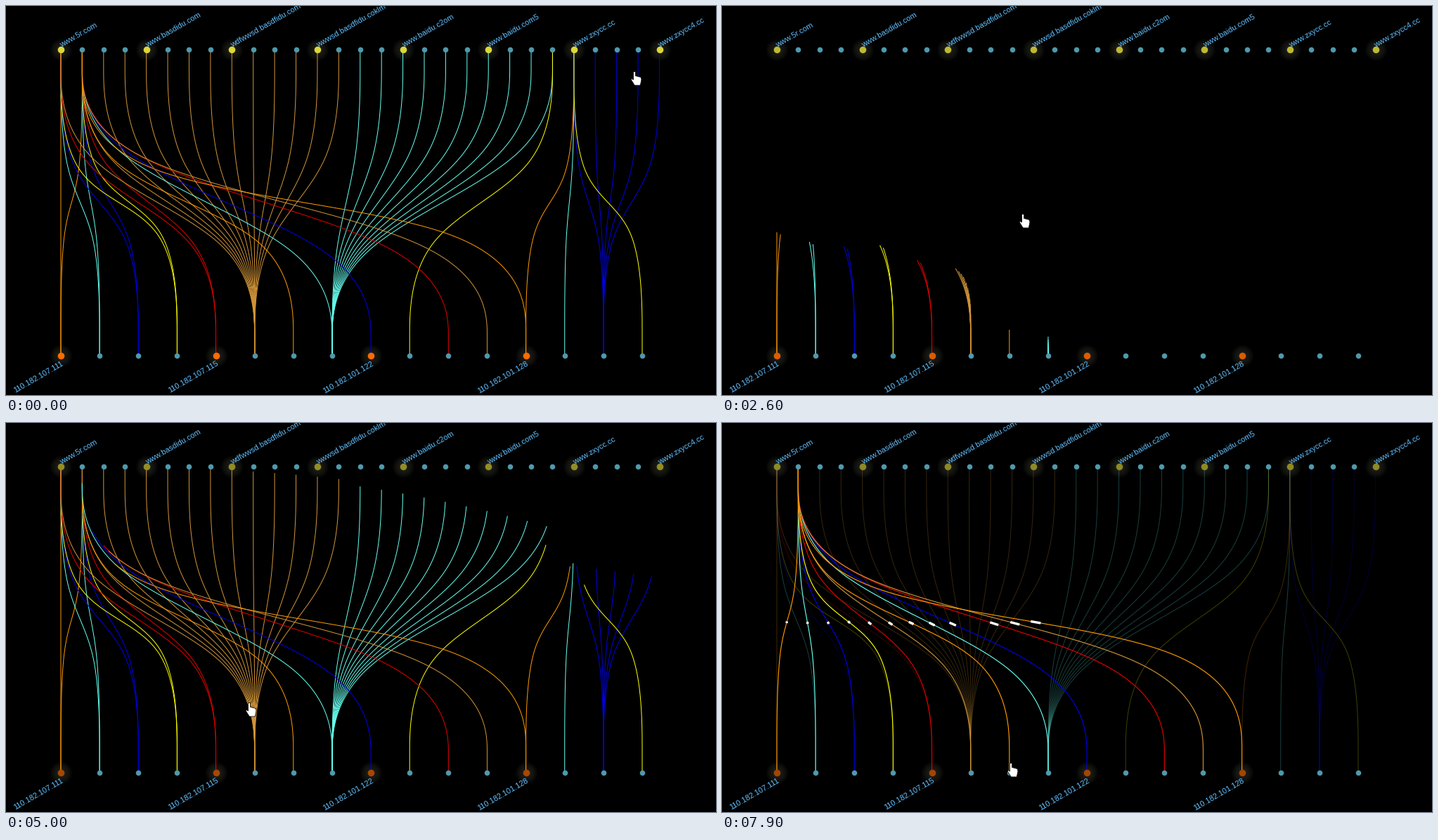
Recreate the animation shown at these times as a matplotlib script. Size 1010 px wide and 554 px high, loop 8 s.

```python
import numpy as np
import matplotlib.pyplot as plt
from matplotlib.animation import FuncAnimation
from matplotlib.collections import LineCollection
from matplotlib.patches import Polygon

W, H, DPI = 1010, 554, 100
STEP, FRAMES = 100, 80
PX = 72 / DPI

TOP_Y, BOTTOM_Y = 61.7, 498.2
top_x = np.linspace(78, 929.5, 29)
bottom_x = np.linspace(78, 905, 16)

PALETTE = ["#ff9900", "#66fff0", "#0000e6", "#ffff00", "#e60000", "#d19438"]
NODE, LABEL = "#4f99ad", "#62c0ff"
SITE = np.array([.87, .845, .22])
HOST = np.array([1, .42, 0])

SITES = ["www.5r.com", "www.basdidu.com", "wdfwwsd.basdfidu.com",
         "wwwsd.basdfidu.coklm", "www.baidu.c2om", "www.baidu.com5",
         "www.zxycc.cc", "www.zxycc4.cc"]
HOSTS = ["110.182.107.111", "110.182.107.115",
         "110.182.101.122", "110.182.101.128"]

RELOAD, GROW, STAGGER = 1300, 1390, 28
SELECT, PICKED = 6250, 1

# Cursor path: time, x, y of the tip
CURSOR = np.array([
    (0, 894, 93), (500, 467, 218), (1100, 467, 218), (2500, 428, 296),
    (4400, 428, 296), (5000, 346, 398), (6000, 106, 62), (6500, 106, 62),
    (7000, 365, 80), (7900, 411, 484)], float)
HAND = np.array([(-1.5, .5), (1.5, .5), (1.6, 6.5), (9.3, 8.5), (10, 12),
                 (8.3, 20), (.2, 20), (-4.8, 12), (-4.4, 10.3), (-1.5, 12)])
ARROW = np.array([(0, 0), (0, 14.5), (3.4, 11.6), (5.8, 17.2), (8.2, 16.2),
                  (5.8, 10.7), (10.2, 10.3)])


def linked_tops(j):
    """Top nodes joined to bottom node j: two hubs, a late hub and fans."""
    fans = {5: range(2, 14), 7: range(14, 24), 9: [23], 14: range(25, 29)}
    tops = set(fans.get(j, []))
    if j < 6:
        tops.add(0)
    if j < 13 and j != 9:
        tops.add(1)
    if j > 11:
        tops.add(24)
    return sorted(tops)


def reach(j):
    """How far the curves of bottom node j stay upright."""
    return (175 + 13 * np.cos(2 * np.pi * j / 3)
            + 15 * np.cos(2 * np.pi * (j - 1.7) / 12))


def spline(ctrl, u):
    """Uniform cubic B-spline with clamped ends, u from 0 to 5."""
    seg = np.clip(u.astype(int), 0, 4)
    t = (u - seg)[:, None]
    a, b, c, d = (ctrl[seg + n] for n in range(4))
    return ((1 - t)**3 * a + (3 * t**3 - 6 * t**2 + 4) * b
            + (-3 * t**3 + 3 * t**2 + 3 * t + 1) * c + t**3 * d) / 6


def controls(j, i):
    x0, x1, r = bottom_x[j], top_x[i], reach(j)
    return np.array([(x0, BOTTOM_Y)] * 3 + [(x0, BOTTOM_Y - r)]
                    + [(x1, TOP_Y + r)] + [(x1, TOP_Y)] * 3)


def travel(ms):
    """Curve position reached after a time; quicker near both ends."""
    return np.interp(ms, [0, 850, 2550, 3400], [0, 1.7, 3.3, 5])


def part(ctrl, u0, u1):
    n = int((u1 - u0) * 40) + 2
    return spline(ctrl, np.linspace(u0, u1, n))


links = [(j, i) for j in range(len(bottom_x)) for i in linked_tops(j)]
ctrls = [controls(j, i) for j, i in links]
full = [part(c, 0, 5) for c in ctrls]
colors = [PALETTE[j % len(PALETTE)] for j, _ in links]
picked = [k for k, (_, i) in enumerate(links) if i == PICKED]
others = [k for k in range(len(links)) if k not in picked]

fig = plt.figure(figsize=(W / DPI, H / DPI), dpi=DPI, facecolor="black")
ax = fig.add_axes([0, 0, 1, 1])
ax.set_xlim(0, W)
ax.set_ylim(H, 0)
ax.axis("off")


def dots(x, y, radius, color, z, alpha=1):
    return ax.scatter(x, np.full(len(x), y), s=(2 * radius * PX)**2,
                      color=[color], linewidths=0, zorder=z, alpha=alpha,
                      snap=False)


def strokes(width, z, **kw):
    lines = LineCollection([], linewidths=width * PX, zorder=z, snap=False,
                           **kw)
    return ax.add_collection(lines, autolim=False)


glows, small, big = [], [], []
for xs, y, color in ((top_x, TOP_Y, SITE), (bottom_x, BOTTOM_Y, HOST)):
    mask = np.arange(len(xs)) % 4 == 0
    glows += [dots(xs[mask], y, r, "#8c8c80", 1, .025) for r in range(6, 17)]
    small.append(dots(xs[~mask], y, 3.8, NODE, 5))
    big.append((dots(xs[mask], y, 4.8, color, 5), color))

style = dict(rotation=30, rotation_mode="anchor", va="baseline", color=LABEL,
             family="Liberation Sans", fontsize=11 * PX, zorder=6)
labels = [ax.text(x + 1, 59, s, ha="left", **style)
          for x, s in zip(top_x[::4], SITES)]
labels += [ax.text(x + 4.5, 511, s, ha="right", **style)
           for x, s in zip(bottom_x[::4], HOSTS)]

lines = strokes(1, 2)
strong = strokes(1.15, 3, colors=[colors[k] for k in picked])
strong.set_segments([full[k] for k in picked])
dashes = strokes(3.4, 4, colors="white", capstyle="butt")
cursor = ax.add_patch(Polygon(HAND, facecolor="white", edgecolor="black",
                              linewidth=.8 * PX, joinstyle="round", zorder=9))


def brightness(ms):
    if ms < GROW:
        return np.interp(ms, [650, 1150], [1, .58])
    return .78 + .14 * np.cos(2 * np.pi * (ms - 3100) / 3250)


def draw_links(ms):
    chosen = ms >= SELECT
    strong.set_visible(chosen)
    dashes.set_visible(chosen)
    if chosen:
        lines.set_segments([full[k] for k in others])
        lines.set_color([(colors[k], .25) for k in others])
        u = travel(ms - SELECT)
        dashes.set_segments([part(ctrls[k], max(u - .015, 0), u + .015)
                             for k in picked])
        return
    segs = full
    if ms >= RELOAD:
        segs = [part(c, 0, travel(ms - GROW - k * STAGGER))
                for k, c in enumerate(ctrls)]
    lines.set_segments(segs)
    lines.set_color(colors)


def draw(frame):
    ms = frame * STEP
    draw_links(ms)

    fade = 1 if ms < RELOAD else np.interp(ms, [1400, 2200], [0, 1])
    for g in glows:
        g.set_alpha(.025 * fade)
    for item in small + labels:
        item.set_alpha(fade)
    for d, color in big:
        d.set_facecolor([color * brightness(ms)])
        d.set_alpha(fade)

    tip = [np.interp(ms, CURSOR[:, 0], CURSOR[:, n]) for n in (1, 2)]
    cursor.set_xy((ARROW if 0 < ms < 2400 else HAND) + tip)
    return []


anim = FuncAnimation(fig, draw, frames=FRAMES, interval=STEP,
                     init_func=lambda: draw(0), repeat=True, repeat_delay=0,
                     blit=False)
plt.show()
```
